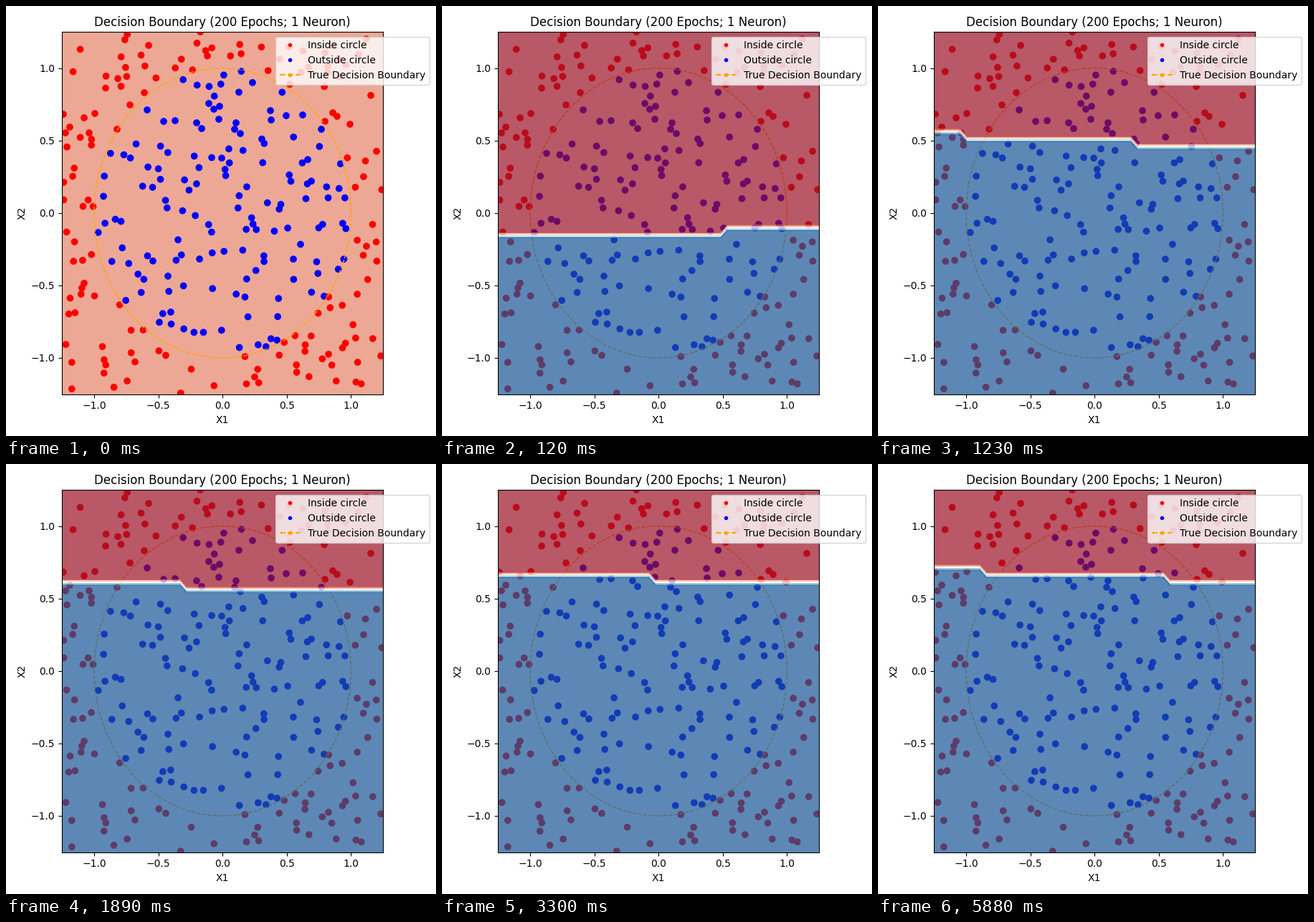
A matplotlib script that plays this animation: 600x600 px, repeating every 6030 ms.

```python
import numpy as np
import matplotlib.pyplot as plt
from matplotlib.animation import FuncAnimation
from matplotlib.lines import Line2D

SIZE = 600
LEFT, RIGHT, TOP, BOTTOM = 78.2, 526.2, 36.1, 541.5
LIMIT = 1.25
FRAMES, INTERVAL = 201, 30
FILL_ALPHA = 0.7

# Samples around the resting boundary, in stage pixels (x, y).
NEAR_BOUNDARY = [
    (173, 138), (155, 172), (80, 151), (83, 177), (89, 169), (109, 156),
    (116, 177), (124, 150), (456, 149), (462, 154), (445, 161), (480, 165),
    (197, 145), (220, 161), (236, 160), (283, 136), (298, 140), (290, 144),
    (297, 158), (266, 163), (273, 171), (321, 163), (319, 172), (327, 178),
    (369, 146), (370, 159), (391, 153), (414, 152), (440, 172),
]

# Learned line y = intercept + slope * x: (epoch, intercept, slope).
LINE_KEYS = np.array([
    (1, -0.26, 0.04), (4, -0.1352, 0.015), (10, 0.06, -0.02),
    (16, 0.22, -0.045), (23, 0.3423, -0.0526), (30, 0.42, -0.049),
    (42, 0.503, -0.037), (52, 0.55, -0.024), (63, 0.58215, -0.015),
    (87, 0.61905, -0.015), (110, 0.63687, -0.016), (127, 0.64397, -0.0185),
    (135, 0.64669, -0.0205), (142, 0.64871, -0.0225),
    (154, 0.65174, -0.026), (166, 0.65338, -0.0284),
    (181, 0.65556, -0.0319), (196, 0.6577, -0.035),
])


def to_data(pixels):
    x, y = np.transpose(pixels)
    return np.column_stack([
        (2 * (x - LEFT) / (RIGHT - LEFT) - 1) * LIMIT,
        (1 - 2 * (y - TOP) / (BOTTOM - TOP)) * LIMIT,
    ])


def scatter_in(points, rng, count, bottom, top, spacing=0.035):
    """Add uniform samples in a band, keeping a small gap between them."""
    goal = len(points) + count
    while len(points) < goal:
        candidate = rng.uniform((-LIMIT, bottom), (LIMIT, top))
        if np.hypot(*(points - candidate).T).min() > spacing:
            points = np.vstack([points, candidate])
    return points


rng = np.random.default_rng(7)
samples = to_data(NEAR_BOUNDARY)
samples = scatter_in(samples, rng, 206, -LIMIT, 0.53)
samples = scatter_in(samples, rng, 56, 0.8, LIMIT)
colors = np.where(np.hypot(*samples.T) > 1, "red", "blue")

plt.rcParams["font.family"] = "DejaVu Sans"
fig = plt.figure(figsize=(6, 6), dpi=100)
ax = fig.add_axes([LEFT / SIZE, 1 - BOTTOM / SIZE,
                   (RIGHT - LEFT) / SIZE, (BOTTOM - TOP) / SIZE])
ax.scatter(*samples.T, c=colors)
ax.add_patch(plt.Circle((0, 0), 1, color="orange", fill=False, ls="--"))
ax.set(xlim=(-LIMIT, LIMIT), ylim=(-LIMIT, LIMIT), xlabel="X1", ylabel="X2",
       title="Decision Boundary (200 Epochs; 1 Neuron)")
ticks = np.linspace(-1, 1, 5)
ax.set_xticks(ticks)
ax.set_yticks(ticks)


def key(color, label, style="none"):
    return Line2D([], [], color=color, marker=".", ls=style, label=label)


ax.legend(handles=[key("red", "Inside circle"),
                   key("blue", "Outside circle"),
                   key("orange", "True Decision Boundary", "--")],
          loc="upper left", borderaxespad=0,
          bbox_to_anchor=(376.5 / SIZE, 1 - 42.5 / SIZE),
          bbox_transform=fig.transFigure)

axis = np.linspace(-LIMIT, LIMIT, 50)
grid_x, grid_y = np.meshgrid(axis, axis)
levels = np.arange(8) * 0.15
cmap = plt.get_cmap("RdBu")
untrained = FILL_ALPHA * np.array(cmap(0.25)[:3]) + 1 - FILL_ALPHA
fills = []


def update(epoch):
    while fills:
        fills.pop().remove()
    ax.set_facecolor(untrained if epoch == 0 else "white")
    if epoch > 0:
        epochs, intercepts, slopes = LINE_KEYS.T
        line = (np.interp(epoch, epochs, intercepts)
                + np.interp(epoch, epochs, slopes) * grid_x)
        predicted = (grid_y <= line).astype(float)
        fills.append(ax.contourf(grid_x, grid_y, predicted, levels=levels,
                                 cmap=cmap, alpha=FILL_ALPHA))
    return fills


anim = FuncAnimation(fig, update, frames=FRAMES, interval=INTERVAL,
                     repeat=True, repeat_delay=0)
plt.show()
```
